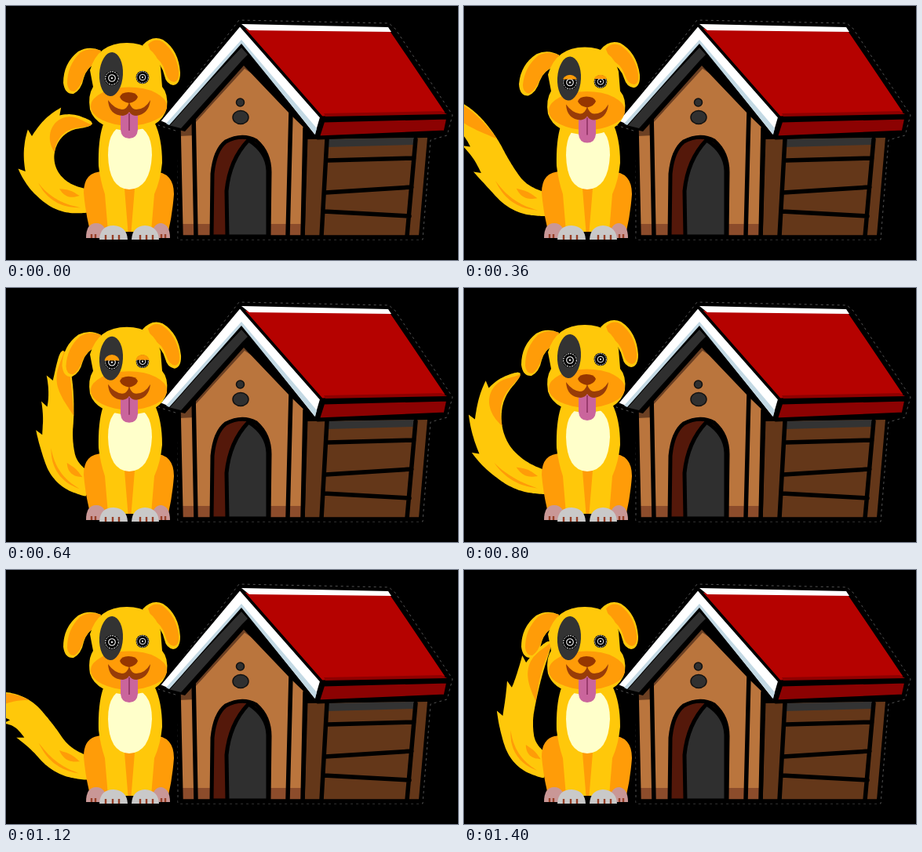
An HTML page for the animation above (1440 ms loop, 576 px wide and 324 px high).

```html
<!DOCTYPE html>
<html lang="en">
<head>
<meta charset="utf-8">
<title>Dog and kennel</title>
<style>
  html, body { margin: 0; width: 100%; height: 100%; overflow: hidden; background: #000; }
  svg { display: block; width: 100vw; height: 100vh; }
  .y { fill: #ffc80a; }
  .o { fill: #ff9c08; }
  .line { fill: none; stroke: #000; stroke-width: 5.5; stroke-linejoin: round; stroke-linecap: round; }
  .edge { stroke: #000; stroke-width: 5; stroke-linejoin: round; }
  .toe { fill: none; stroke: #984028; stroke-width: 2.4; }
</style>
</head>
<body>
<svg viewBox="0 0 576 324">
  <defs>
    <g id="eye">
      <circle r="9.5"/>
      <g fill="none" stroke="#fff">
        <circle r="8.3" stroke-width="1" stroke-dasharray="2 1"/>
        <circle r="4.3" stroke-width="1.1"/>
      </g>
      <circle r="1.3" fill="#ddd"/>
    </g>
    <clipPath id="lidClip"><rect id="lidBox" x="-12" y="-10" width="24" height="0"/></clipPath>
    <circle id="lid" class="o" r="9.8" clip-path="url(#lidClip)"/>
  </defs>
  <rect width="576" height="324"/>

  <g id="house">
    <path d="M219 297V160L194 152L297 18L488 22L496 29L569 139L562 165L541 171L531 298H219" fill="none" stroke="#666" stroke-width=".8" stroke-dasharray="3 4"/>
    <!-- side wall -->
    <path d="M384 170L537 168L526 293L379 293Z" fill="#643719"/>
    <path d="M410 170L521 168L520 177L409 180Z" fill="#333"/>
    <path class="line" d="M409 170L402 294M522 170L511 294M410 197L520 194M407 238L517 231M405 262L514 268M382 160L378 294"/>
    <!-- front wall -->
    <path d="M303 68L364 136L381 156L377 293L223 293L220 160L238 138Z" fill="#ba753d"/>
    <path d="M303 70L322 92L304 80L242 148L241 165L221 166L220 160Z" fill="#6c4023"/>
    <path d="M223 278H262V293H223ZM337 278H377V293H337Z" fill="#8c4c2b"/>
    <path class="line" d="M220 156L223 294M239 136L242 294M363 135L359 294M381 156L378 294M222 295H528"/>
    <!-- doorway -->
    <path class="edge" d="M262 294L263 214Q266 184 280 173Q301 162 319 172Q336 187 336 212L335 294Z" fill="#54180a"/>
    <path class="edge" d="M282 294L281 236Q285 196 309 171Q333 186 334 210L334 294Z" fill="#2f2f2f"/>
    <g fill="#303030" stroke="#111" stroke-width="1.5">
      <circle cx="298.500" cy="123" r="5"/>
      <ellipse cx="299" cy="142" rx="10" ry="8.500"/>
    </g>
    <!-- roof -->
    <path class="edge" d="M299 26L491 30L564 138L402 143Z" fill="#b50200"/>
    <path d="M300 23L487 27L491 33L310 31Z" fill="#fff"/>
    <path d="M555 134L405 137L407 141L562 138Z" fill="#8f0000"/>
    <path class="edge" d="M404 146L564 142L560 161L397 168Z" fill="#8c0202"/>
    <path d="M300 42L200 153L228 160L303 76L364 140L394 169L398 150Z"/>
    <path d="M300 53L207 152L223 156L301 69L308 62Z" fill="#2f2f2f"/>
    <path d="M298 25L196 147L208 152L300 48L394 166L401 142Z" fill="#fff" stroke="#000" stroke-width="2"/>
    <path d="M300 43L204 150L208 152L300 48L394 164L396 156Z" fill="#c3d9e4"/>
  </g>

  <g id="tail">
    <path id="fur" class="y"/>
    <path id="tipPatch" class="o"/>
    <path id="leaf" class="o"/>
    <path id="streak" class="o"/>
  </g>

  <g id="body">
    <path class="o" d="M124 211Q99 211 99 238Q101 262 107 287L132 288L134 225ZM188 211Q214 212 214 240Q212 266 207 287L182 288L181 225Z"/>
    <g fill="#c99796">
      <path d="M102 296Q102 277 115 277Q128 277 128 296Z"/>
      <path d="M186 296Q186 277 198 277Q209 279 209 296Z"/>
    </g>
    <path class="toe" d="M109 291V296M114 291V296M198 291V296M203 291V296"/>
    <path class="y" d="M125 148Q117 168 118 204Q120 222 126 240L130 288H185L189 240Q197 222 199 200Q199 168 189 148Z"/>
    <path class="o" d="M151 233H164L159.500 288H155.500Z"/>
    <path d="M157 151Q186 152 186 190Q184 233 157 234Q131 233 130 190Q130 152 157 151Z" fill="#ffffca"/>
    <g fill="#c9c9c9">
      <path d="M119 298Q120 280 137 280Q154 281 155 298Z"/>
      <path d="M160 298Q161 281 177 280Q194 281 195 298Z"/>
    </g>
    <path class="toe" d="M127 292V298M136 292V298M144 292V298M171 292V298M179 292V298M187 292V298"/>
  </g>

  <g id="head">
    <g id="earL">
      <path class="y" d="M121 57Q106 50 92 58Q73 73 73 98Q75 113 86 112Q96 107 99 92Q103 78 116 72Z"/>
      <path class="o" d="M121 57Q106 52 94 60Q78 76 78 99Q79 109 87 109Q95 104 99 90Q104 77 116 72Z"/>
    </g>
    <g id="earR">
      <path class="y" d="M174 50Q186 37 200 43Q220 56 222 85Q222 100 213 101Q204 99 202 89Q199 74 186 67Z"/>
      <path class="o" d="M181 49Q190 40 200 46Q217 59 220 83Q221 96 214 97Q206 96 203 84Q199 69 186 63Z"/>
    </g>
    <path class="y" d="M154 47Q189 47 197 78L199 103Q207 112 205 130Q198 157 157 159Q115 157 107 132Q104 114 111 103L107 82Q117 47 154 47Z"/>
    <ellipse class="o" cx="156.500" cy="128" rx="48.500" ry="24.500"/>
    <ellipse cx="134" cy="87" rx="15" ry="28" fill="#333" transform="rotate(3 134 87)"/>
    <use href="#eye" x="135" y="92"/>
    <use href="#eye" transform="translate(174 91) scale(.88)"/>
    <use href="#lid" x="135" y="92"/>
    <use href="#lid" transform="translate(174 91) scale(.9)"/>
    <path d="M146 135H168V158Q167 169 157 169Q147 169 146 158Z" fill="#ca659c"/>
    <path d="M157 137V159" stroke="#8e3262" stroke-width="1.600"/>
    <path d="M130 120Q131 139 149 140Q155 139 157 135Q160 140 166 140Q182 138 184 120Q177 132 166 132Q160 132 157 123Q154 132 148 132Q138 131 130 120Z" fill="#983c08"/>
    <path d="M145 116Q147 110 156 110Q166 110 168 116Q166 122 157 124Q147 122 145 116Z" fill="#963600"/>
  </g>
</svg>
<script>
const LOOP = 1440, SWING = 720, STEP = 40, STEPS = 100;
const $ = id => document.getElementById(id);

// Tail poses: time in swing, base height, segment length,
// then headings from base to tip (0 left, 90 up, 180 right)
const poses = [
  [0, 250, 38, 8, 48, 92, 135, 185],
  [80, 250, 40, 15, 43, 76, 106, 144],
  [160, 250, 42, 18, 43, 63, 84, 111],
  [360, 255, 41, 14, 54, 66, 56, 36],
  [400, 255, 41, 18, 55, 52, 10, -15],
  [520, 253, 41, 18, 56, 72, 47, 15],
  [680, 254, 38, 30, 80, 104, 112, 122]
];

function poseAt(i) {
  const n = poses.length, lap = Math.floor(i / n), p = poses[i - lap * n];
  return [p[0] + lap * SWING, ...p.slice(1)];
}

// Smooth periodic interpolation through the poses
function tailPose(t) {
  let i = poses.length - 1;
  while (poses[i][0] > t) i--;
  const [a, b, c, d] = [-1, 0, 1, 2].map(k => poseAt(i + k));
  const h = c[0] - b[0], u = (t - b[0]) / h;
  return b.slice(1).map((v, k) => {
    const j = k + 1;
    const m0 = (c[j] - a[j]) / (c[0] - a[0]) * h;
    const m1 = (d[j] - b[j]) / (d[0] - b[0]) * h;
    return v + u * (m0 + u * (3 * (c[j] - v) - 2 * m0 - m1 + u * (2 * (v - c[j]) + m0 + m1)));
  });
}

function spine([y, seg, ...turns]) {
  const pts = [], n = turns.length, step = seg * n / STEPS;
  let x = 108;
  for (let i = 0; i <= STEPS; i++) {
    const q = Math.min(n - 1, Math.max(0, i / STEPS * n - .5));
    const k = Math.min(n - 2, Math.floor(q));
    const a = (turns[k] + (turns[k + 1] - turns[k]) * (q - k)) * Math.PI / 180;
    pts.push([x, y, a]);
    x -= Math.cos(a) * step;
    y -= Math.sin(a) * step;
  }
  return pts;
}

const width = s => (13 + 7 * Math.sin(Math.PI * s ** .7)) * Math.sqrt(1 - s ** 4);
const tuft = s => s > .26 && s < .8 ? 9 * ((s - .26) / .18 % 1) ** 2 : 0;
const bump = (s, a, b) => Math.sin(Math.PI * (s - a) / (b - a));

// Closed band along the spine between two offsets; sweep pushes the outer side tipwards
function band(pts, from, to, outer, inner, sweep = () => 0) {
  const side = (offset, push) => {
    const out = [];
    for (let i = Math.round(from * STEPS); i <= Math.round(to * STEPS); i++) {
      const s = i / STEPS, [x, y, a] = pts[i], d = offset(s), p = push(s);
      const c = Math.cos(a), n = Math.sin(a);
      out.push((x + d * n - p * c).toFixed(1) + ' ' + (y - d * c - p * n).toFixed(1));
    }
    return out;
  };
  return 'M' + side(outer, sweep).concat(side(inner, () => 0).reverse()).join('L') + 'Z';
}

// Pointed sliver centred on an offset
function sliver(pts, from, to, mid, half) {
  const edge = k => s => mid + k * half * bump(s, from, to);
  return band(pts, from, to, edge(-1), edge(1));
}

function drawTail(t) {
  const pts = spine(tailPose(t));
  const rim = s => width(s) - 2 * bump(s, .58, 1);
  $('fur').setAttribute('d', band(pts, 0, 1, s => -width(s) - tuft(s), width, tuft));
  $('tipPatch').setAttribute('d', band(pts, .58, 1, s => width(s) - 20 * bump(s, .58, 1), rim));
  $('leaf').setAttribute('d', sliver(pts, .08, .24, 6, 4));
  $('streak').setAttribute('d', sliver(pts, .06, .36, -9, 1.8));
}

function track(keys, t) {
  const i = keys.findIndex(k => k[0] > t);
  if (i < 1) return 0;
  const [a, b] = [keys[i - 1], keys[i]], u = (t - a[0]) / (b[0] - a[0]);
  return a[1] + (b[1] - a[1]) * u * u * (3 - 2 * u);
}

const nod = [[200, 0], [340, 1], [560, 1], [720, 0]];
const blink = [[260, 0], [360, .3], [480, .82], [540, .85], [600, .6], [700, 0]];

function frame() {
  const t = Math.floor(performance.now() % LOOP / STEP) * STEP;
  const n = track(nod, t);
  drawTail(t % SWING);
  $('head').setAttribute('transform', `translate(0 ${5.5 * n})`);
  $('earL').setAttribute('transform', `rotate(${5 * n} 118 62)`);
  $('earR').setAttribute('transform', `rotate(${-4 * n} 183 55)`);
  $('lidBox').setAttribute('height', 20 * track(blink, t));
  requestAnimationFrame(frame);
}
frame();
</script>
</body>
</html>
```
